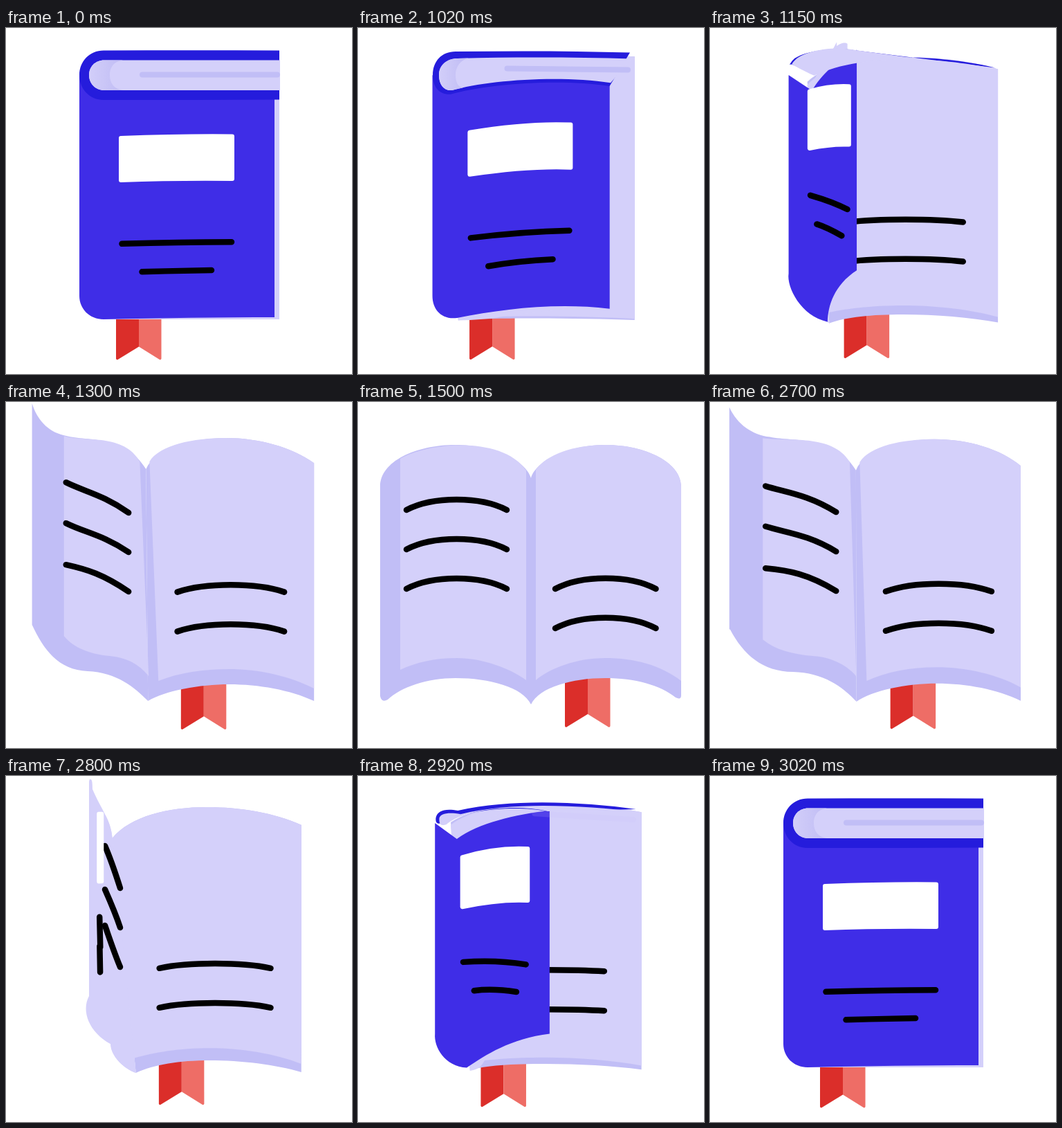
An HTML page that plays this animation: 500 px wide and 500 px high, repeating every 3.05 s.

```html
<!DOCTYPE html>
<html lang="en">
<head>
<meta charset="utf-8">
<title>Opening book</title>
<style>
  html, body { margin: 0; width: 100%; height: 100%; overflow: hidden; background: #fff; }
  svg { display: block; width: 100%; height: 100%; }
  path { stroke-linecap: round; stroke-linejoin: round; }
</style>
</head>
<body>
<svg id="stage" viewBox="0 0 500 500">
  <defs>
    <linearGradient id="fold"><stop offset="0" stop-color="#d2cef9"/><stop offset="1" stop-color="#bfbbf4"/></linearGradient>
  </defs>
</svg>
<script>
const LOOP = 3050, LIGHT = [212, 208, 250], DARK = [193, 190, 246];
const rgb = c => `rgb(${c.map(Math.round)})`;
const clamp = v => Math.max(0, Math.min(1, v));
const stage = document.getElementById('stage');

function addPath(fill, stroke = 'none', width = 0) {
  const el = document.createElementNS('http://www.w3.org/2000/svg', 'path');
  el.setAttribute('fill', fill);
  el.setAttribute('stroke', stroke);
  el.setAttribute('stroke-width', width);
  stage.append(el);
  return el;
}

// Monotone cubic interpolation through (xs, ys).
function curve(xs, ys) {
  const slopes = ys.slice(1).map((y, i) => (y - ys[i]) / (xs[i + 1] - xs[i]));
  const tangents = ys.map((_, i) => {
    const a = slopes[i - 1] ?? slopes[i], b = slopes[i] ?? a;
    return a * b > 0 ? 2 * a * b / (a + b) : 0;
  });
  return x => {
    x = Math.max(xs[0], Math.min(xs.at(-1), x));
    let i = 0;
    while (i < xs.length - 2 && x > xs[i + 1]) i++;
    const h = xs[i + 1] - xs[i], t = (x - xs[i]) / h, s = 1 - t;
    return s * s * (1 + 2 * t) * ys[i] + t * t * (3 - 2 * t) * ys[i + 1]
      + h * t * s * (s * tangents[i] - t * tangents[i + 1]);
  };
}

// Morphs between path poses that share one command structure.
function morph(keys, poses) {
  const number = /-?[\d.]+/g;
  const values = poses.map(p => p.match(number).map(Number));
  const curves = values[0].map((_, i) => curve(keys, values.map(v => v[i])));
  return u => {
    let i = 0;
    return poses[0].replace(number, () => curves[i++](u).toFixed(2));
  };
}

const PAGE = [0, .464, .614, .8, 1], LEAF = PAGE.slice(1), COVER = [0, .07, .464];

const parts = [];
const part = (el, shape, from = 0, to = 1) => (parts.push({ el, shape, from, to }), el);

const ribbonLeft = addPath('#db2e2a'), ribbonRight = addPath('#ee6d66');

part(addPath(rgb(DARK)), morph(PAGE, [
  'M120 40C150 38 200 37 250 37C300 37 350 36 395 36L395 421Q395 421 395 421C350 421 300 421 250 421C200 421 150 421 137 421Z',
  'M154 90C180 58 235 45 290 45C340 45 387 53 427 71L427 428Q427 428 427 428C390 417 340 411 295 411C250 411 215 417 188 429Z',
  'M202 97C215 66 270 52 318 52C365 52 412 65 445 88L445 432Q445 432 445 432C410 416 365 408 322 408C280 408 230 417 205 432Z',
  'M234 104C246 75 298 59 345 59C400 59 448 78 460 106L460 430Q460 432 458 430C435 412 385 402 345 402C295 402 250 414 236 436Z',
  'M250 110C257 84 307 62 357 62C417 62 467 88 467 122L467 424Q467 431 459 427C437 409 400 399 357 399C310 399 262 412 250 437Z'
]));
part(addPath(rgb(LIGHT)), morph(PAGE, [
  'M120 40C150 38 200 37 250 37C300 37 350 36 395 36L395 421C350 421 300 421 250 421C200 421 150 421 137 421Z',
  'M154 90C180 58 235 45 290 45C340 45 387 53 427 71L427 416C390 401 340 393 295 393C250 393 215 399 184 408Z',
  'M207 86C222 62 270 52 318 52C365 52 412 65 445 88L445 414C410 396 365 386 322 386C285 386 250 391 220 403Z',
  'M240 95C256 70 298 59 345 59C400 59 448 78 460 106L460 405C435 386 385 374 345 374C300 374 265 388 243 403Z',
  'M257 98C272 76 312 62 357 62C417 62 467 88 467 122L467 403C437 380 400 370 357 370C315 370 277 385 257 402Z'
]));

const rightLines = addPath('none', '#000', 8.5);

const leafEdge = part(addPath(rgb(DARK)), morph(PAGE, [
  'M388 104C350 104 300 104 250 104C200 104 150 104 120 104L137 421C150 421 200 418 250 418C300 418 350 418 388 418Q388 418 388 418Z',
  'M119 5C124 3 124 10 124 38C140 46 152 66 154 90L188 429C172 424 151 405 151 387C120 370 108 340 119 318Q119 318 119 318Z',
  'M38 2C45 25 60 42 83 48C115 58 170 45 202 97L205 432C185 412 160 391 118 389C75 387 55 358 38 322Q38 322 38 322Z',
  'M8 62C30 62 75 60 120 58C170 56 225 72 234 104L236 436C222 411 180 395 135 395C85 395 35 392 12 380Q8 378 8 376Z',
  'M32 122C32 86 83 62 141 62C193 62 243 84 250 110L250 437C238 412 190 399 141 399C100 399 62 412 43 430Q34 435 32 425Z'
]));
part(addPath(rgb(LIGHT)), morph(PAGE, [
  'M388 104C300 104 200 104 120 104L137 421C200 421 220 418 250 418C300 418 350 418 388 418Z',
  'M119 5C130 40 152 60 154 90L188 429C172 424 151 405 151 387C120 370 108 340 119 318Z',
  'M84 49C115 58 170 45 193 86L206 396C195 383 180 370 150 367C120 364 98 355 84 338Z',
  'M58 60C100 56 200 46 227 94L229 400C215 383 175 368 143 368C110 368 85 367 58 361Z',
  'M61 82C105 57 210 50 243 99L243 402C220 385 180 370 143 370C110 370 85 376 61 387Z'
]));
part(addPath('none', '#000', 8.5), morph(LEAF, [
  'M143 101C150 117 158 140 165 162M143 164C151 182 158 198 165 219M143 216C150 236 157 257 165 276',
  'M87 116C115 130 140 134 177 160M87 175C115 189 140 192 177 217M87 235C118 242 140 249 177 274',
  'M67 142C105 133 160 134 203 156M67 199C105 190 160 191 203 213M67 257C105 247 160 248 203 270',
  'M70 156C108 136 177 136 215 156M70 213C108 193 177 193 215 213M70 270C108 250 177 250 215 270'
]), .44);

const SWAP = .44;
part(addPath('#3f2de7'), morph(COVER, [
  'M106 68L106 387C106 406 121 421 141 421C225 419 310 418 388 418L388 100C310 100 225 100 141 100Z',
  'M107.5 68L107.5 387C107.5 406 120 422 143 419C210 406 285 397 364.5 406L364.5 82C290 71 200 76 139 92Z',
  'M117 68L117 330C112 350 140 412 188 429C150 400 119 360 119 318L119 5C119 40 145 60 154 90Z'
]), 0, SWAP);
part(addPath('#251cdc'), morph(COVER, [
  'M395 32.5C310 32 225 32 141 32.5C121 32.5 106 48 106 68C106 88 121 104 141 104C225 104 310 104 395 103.5Z',
  'M393 35.5C310 33 225 33 141 34C121 34 108 48 108 68C108 86 118 97 134 96C185 82 290 73 364.5 84.5Z',
  'M427 71C380 48 230 28 154 88C140 75 125 55 119 40C117 36 115 20 117 12C118 8 119 5 119 5Z'
]), 0, SWAP);
part(addPath(rgb(LIGHT)), morph(COVER, [
  'M396 46.5C310 46.5 225 46.5 142 46.5C129 46.5 120 56 120 68C120 80 129 90 142 90C225 90 310 90 396 90Z',
  'M395 44.5C310 42 225 42 144 44C128 44 117 54 117 68C117 82 124 91 136 90C185 76 290 68 366 79.5Z',
  'M427 71C380 48 230 28 154 88C140 75 125 55 119 40C117 36 115 20 117 12C118 8 119 5 119 5Z'
]), 0, SWAP);

const curlShade = part(addPath('url(#fold)'), morph(COVER, [
  'M172 46.5L142 46.5C129 46.5 120 56 120 68C120 80 129 90 142 90L172 90C157 90 150 80 150 68C150 56 157 46.5 172 46.5Z',
  'M160 43.5L144 44C128 44 117 54 117 68C117 82 124 91 136 90L152 86.5C145 86 141 78 141 68C141 56 148 46 160 43.5Z',
  'M154 88L150 84C140 75 125 55 119 40C117 36 115 20 117 12L119 5C117 36 125 55 130 60C140 70 150 80 154 88Z'
]), 0, .25);
const curlLine = part(addPath('none', rgb(DARK), 8), morph(COVER, [
  'M197 67.5L392 67.5', 'M215 58.5L390 60.5', 'M316 50L420 70'
]), 0, .25);

part(addPath('#fff', '#fff', 6), morph(COVER, [
  'M166 159C220 157 280 156 327 156.5L327 218C280 217.5 220 218 166 220Z',
  'M161.5 151C210 143 260 138 308 140L308 202C260 200 210 205 161.5 212Z',
  'M134 54C135 54 136 54 137 54L137 152C136 152 135 152 134 152Z'
]), 0, .5);
part(addPath('none', '#000', 8.5), morph(COVER, [
  'M167.5 311.8C220 310.5 275 309.6 326 309.3M196.5 352.3C230 351.3 265 350.5 297 350',
  'M163 303.7C210 298 260 294 306 293M188.5 344.5C220 339 250 336 282 334.5',
  'M135 203C135 218 135 232 135 247M135 245C135 258 135 270 135 283'
]), 0, .5);

function openness(t) {
  if (t < 1020 || t >= 3020) return 0;
  if (t < 1500) return clamp((t - 984) / 515);
  return t < 2550 ? 1 : clamp(1 - (t - 2524) / 514);
}

function draw(u) {
  const p = u * u * (3 - 2 * u);
  for (const { el, shape, from, to } of parts) {
    const visible = u >= from && u <= to;
    el.style.display = visible ? '' : 'none';
    if (visible) el.setAttribute('d', shape(u));
  }

  const x = 159 + 140 * p, bottom = 479.5 - 9.5 * p, notch = bottom - 19;
  ribbonLeft.setAttribute('d', `M${x} 380H${x + 33}V${notch}L${x + 2} ${bottom}Q${x} ${bottom} ${x} ${bottom - 2}Z`);
  ribbonRight.setAttribute('d', `M${x + 33} 380H${x + 65.5}V${bottom - 2}Q${x + 65.5} ${bottom} ${x + 63.5} ${bottom}L${x + 33} ${notch}Z`);

  const left = 171.5 + 113.5 * p, right = 344.5 + 86 * p, inset = (right - left) * .26;
  rightLines.setAttribute('d', [284, 341].map(base => {
    const y = base - 14 * p, top = y - 20.5 * p;
    return `M${left} ${y}C${left + inset} ${top} ${right - inset} ${top} ${right} ${y}`;
  }).join(''));

  const shade = clamp((u - .464) / .1);
  leafEdge.setAttribute('fill', rgb(LIGHT.map((c, i) => c + (DARK[i] - c) * shade)));
  curlShade.style.opacity = curlLine.style.opacity = clamp((.25 - u) / .15);
}

function frame() {
  draw(openness(performance.now() % LOOP));
  requestAnimationFrame(frame);
}
frame();
</script>
</body>
</html>
```
